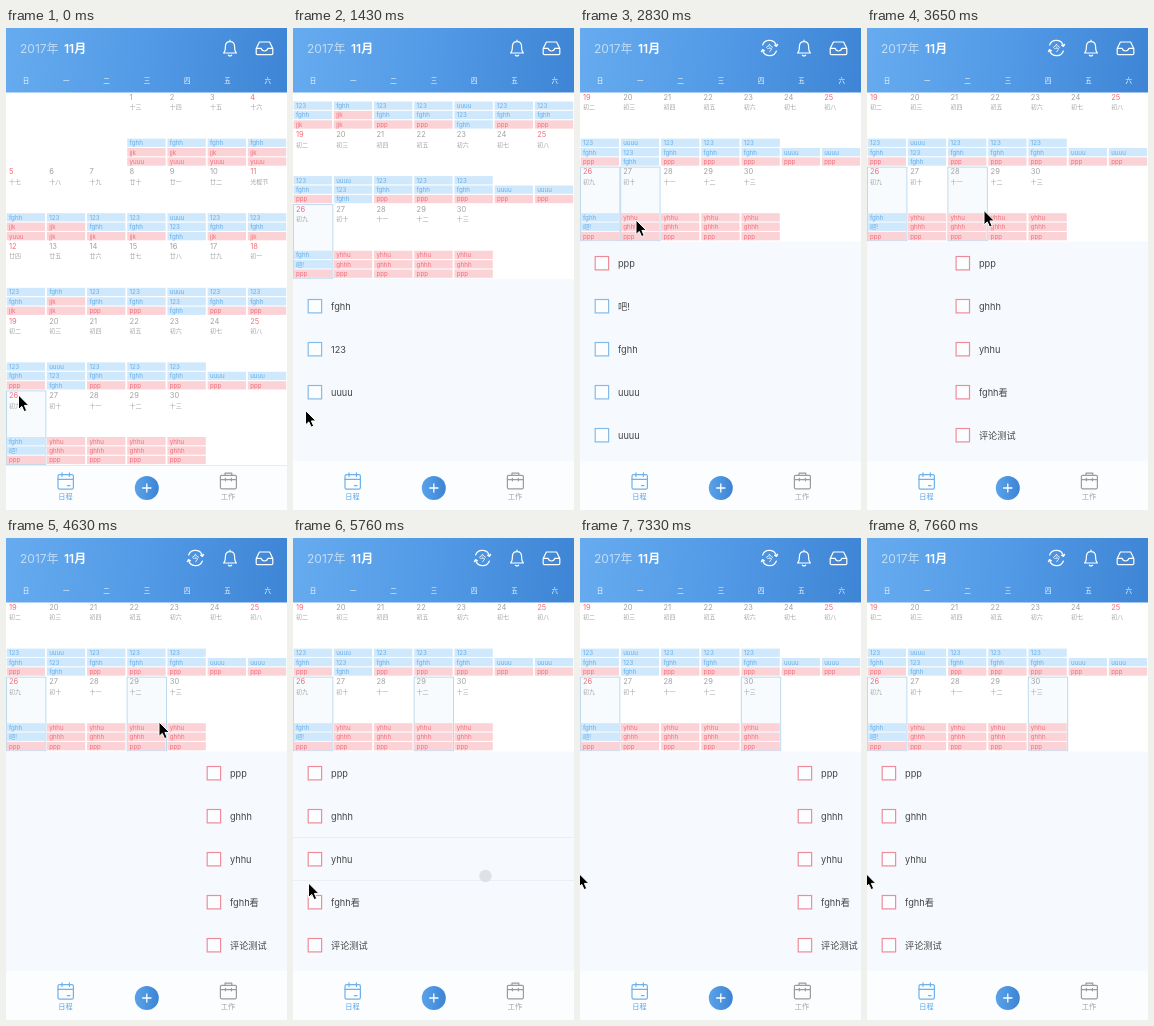
An HTML page for the animation above (7990 ms loop, 281 px wide and 482 px high).

```html
<!DOCTYPE html>
<html lang="zh-CN">
<head>
<meta charset="utf-8">
<title>日程</title>
<style>
html, body { margin: 0; width: 100%; height: 100%; overflow: hidden; background: #fff; }
svg { display: block; width: 281px; height: 482px; }
text { font-family: Inter, "Noto Sans CJK SC", "Noto Sans CJK", sans-serif; }
.line { fill: none; stroke-width: 1.2; stroke-linecap: round; stroke-linejoin: round; }
</style>
</head>
<body>
<svg id="stage" viewBox="0 0 281 482" xmlns="http://www.w3.org/2000/svg">
  <defs>
    <linearGradient id="sky" gradientUnits="userSpaceOnUse" x1="0" y1="20" x2="281" y2="50">
      <stop offset="0" stop-color="#66abef"/><stop offset=".5" stop-color="#529ae6"/><stop offset="1" stop-color="#3e86d5"/>
    </linearGradient>
    <linearGradient id="disc"><stop offset="0" stop-color="#5aa3ea"/><stop offset="1" stop-color="#3c84d4"/></linearGradient>
    <clipPath id="body"><rect y="64" width="281" height="373"/></clipPath>
  </defs>
  <rect width="281" height="482" fill="#fcfdfe"/>
  <rect y="200" width="281" height="233" fill="#f6fafe"/>
  <path id="tabLine" d="M0 428.5H281" stroke="#e0ebf5"/>
  <g id="pages"></g>
  <path id="rowTop" d="M0 299.5H281" stroke="#e9eff5"/>
  <path id="rowEnd" d="M0 342.5H281" stroke="#e9eff5"/>
  <g clip-path="url(#body)"><g id="cal"><rect y="64" width="281" height="373.2" fill="#fff"/></g></g>

  <rect width="281" height="64.5" fill="url(#sky)"/>
  <g id="head"></g>
  <g class="line" stroke="#fff">
    <g id="today">
      <path d="M182.6 17A7.2 7.2 0 0 1 196.4 18.2M196.4 23A7.2 7.2 0 0 1 182.6 21.8M194.6 17.2L196.5 18.4L197.6 16.4M184.4 22.8L182.5 21.6L181.4 23.6"/>
    </g>
    <path d="M217.6 25H230.4C228.8 23.6 228.6 22.4 228.6 18.6C228.6 15.4 226.8 13.6 224 13.6C221.2 13.6 219.4 15.4 219.4 18.6C219.4 22.4 219.2 23.6 217.6 25ZM222.4 27.2Q224 28.6 225.6 27.2M224 12.2V13.4"/>
    <path d="M250.2 20.4L253.4 14H263.6L266.8 20.4V25.4Q266.8 26.6 265.6 26.6H251.4Q250.2 26.6 250.2 25.4ZM250.2 20.4H255.2Q255.8 23 258.5 23Q261.2 23 261.8 20.4H266.8"/>
  </g>

  <rect y="437" width="281" height="45" fill="#fcfdfe"/>
  <path id="barLine" d="M0 437.5H281" stroke="#e6ebf0"/>
  <g class="line" stroke="#6fb1ea" stroke-width="1">
    <rect x="52" y="446.6" width="15.4" height="14.6" rx="1.6"/>
    <path d="M52 451.4H67.4M56 444.8V448.4M63.4 444.8V448.4M61.4 457.6H64"/>
  </g>
  <g class="line" stroke="#9b9b9b" stroke-width="1">
    <rect x="214.4" y="447.4" width="16" height="13.4" rx="1.2"/>
    <path d="M219 447.2V445.2H225.8V447.2M214.4 451.6H219.4M225.4 451.6H230.4M219.4 450.4V452.8M225.4 450.4V452.8M219.4 451.6H225.4"/>
  </g>
  <g id="tabs"></g>
  <circle cx="140.8" cy="460" r="12" fill="url(#disc)"/>
  <path d="M136.2 460H145.4M140.8 455.4V464.6" stroke="#fff" stroke-width="1.3"/>

  <circle id="touch" cy="338" r="6.2" fill="#d9dde2" opacity=".85"/>
  <path id="cursor" d="M0 0V14.4L3.3 11.4L5.6 16.6L8.2 15.5L5.9 10.4H10.4Z" fill="#000" stroke="#fff" stroke-width="1"/>
</svg>
<script>
const LOOP = 7990, W = 281, COL = 40.2, ROW = 74.6, TOP = 64;
const BLUE = '#64aeea', RED = '#f2707d';
const $ = id => document.getElementById(id);

function add(parent, tag, attrs, content) {
  const el = document.createElementNS('http://www.w3.org/2000/svg', tag);
  for (const k in attrs) el.setAttribute(k, attrs[k]);
  if (content) el.textContent = content;
  parent.appendChild(el);
  return el;
}

// Text placed by the vertical centre of its line
function label(parent, text, x, mid, size, fill, extra) {
  return add(parent, 'text', { x, y: mid + size * 0.36, 'font-size': size, fill, ...extra }, text);
}

const isRed = name => ['jjk', 'yuuu', 'yhhu', 'ghhh', 'ppp'].includes(name);
const mid = { 'text-anchor': 'middle' };

// Header and tab labels
label($('head'), '2017年', 14, 20.5, 12, '#fff', { opacity: 0.6 });
label($('head'), '11月', 58, 20.5, 12, '#fff', { 'font-weight': 600 });
[...'日一二三四五六'].forEach((d, i) => label($('head'), d, 20 + i * 40.3, 53, 6.5, '#fff', mid));
label($('today'), '今', 189.5, 20, 7.5, '#fff', { ...mid, stroke: 'none' });
label($('tabs'), '日程', 59.5, 468.8, 7.2, '#58a4e8', mid);
label($('tabs'), '工作', 222, 468.8, 7.2, '#a5a5a5', mid);

// Calendar
const lunar = ('十三 十四 十五 十六 十七 十八 十九 廿十 廿一 廿二 光棍节 廿四 廿五 廿六 廿七 廿八 廿九 ' +
  '初一 初二 初三 初四 初五 初六 初七 初八 初九 初十 十一 十二 十三').split(' ');
const first = 'fghh,jjk,yuuu', second = '123,fghh,jjk', third = '123,fghh,ppp';
const shifted = 'uuuu,123,fghh', late = ',uuuu,ppp', last = 'yhhu,ghhh,ppp';
const plans = [
  first, first, first, first,
  first, '123,jjk,jjk', second, second, shifted, second, second,
  second, 'fghh,jjk,jjk', third, third, shifted, third, third,
  third, shifted, third, third, third, late, late,
  'fghh,吧!,ppp', last, last, last, last
];
const cal = $('cal');
const cellBox = day => {
  const n = day + 2;
  return { x: (n % 7) * COL, y: TOP + Math.floor(n / 7) * ROW };
};
const frameOf = day => {
  const { x, y } = cellBox(day);
  return add(cal, 'rect', { x: x + 0.5, y: y + 0.5, width: COL - 0.8, height: ROW - 1,
    fill: '#f8fbfe', stroke: '#b9d6ec', 'stroke-width': 0.9 });
};
const picks = [26, 27, 28, 29, 30].map(frameOf);

plans.forEach((plan, i) => {
  const { x, y } = cellBox(i + 1);
  const weekend = (i + 3) % 7 === 0 || (i + 3) % 7 === 6;
  label(cal, i + 1, x + 3, y + 5, 7.5, weekend ? RED : '#a0a0a0');
  label(cal, lunar[i], x + 3, y + 15, 6, '#a2a2a2');
  plan.split(',').forEach((name, k) => {
    if (!name) return;
    const red = isRed(name), by = y + 46.6 + k * 9.4;
    add(cal, 'rect', { x: x + 0.6, y: by, width: COL - 1.8, height: 8.3, fill: red ? '#fbd3d6' : '#d0e8fb' });
    label(cal, name, x + 3, by + 4.3, 6.2, red ? RED : BLUE);
  });
});

// Task lists, one page per day
function page(index, names) {
  const g = add($('pages'), 'g', { transform: `translate(${index * W})` });
  names.split(' ').forEach((name, i) => {
    const y = 235.3 + i * 43, red = index > 0 || isRed(name);
    add(g, 'rect', { x: 15.2, y: y - 6.8, width: 13.4, height: 13.4, fill: '#fbfdff',
      stroke: red ? '#f08c9a' : '#86bbe9', 'stroke-width': 1.2 });
    label(g, name, 38, y + 0.3, 9.2, '#454545');
  });
  return g;
}
const oldList = page(0, 'ppp fghh 123 uuuu');
const newList = page(0, 'ppp 吧! fghh uuuu uuuu');
for (let i = 1; i < 6; i++) page(i, 'ppp ghhh yhhu fghh看 评论测试');

// Tracks: [time, values...]; two points at one time make a hard change
const shift = [[1430, 0], [1430, 186.3], [1480, 186.3], [1810, 223.8]];
const pan = [[2830, 0], [3150, 1], [3650, 1], [3650, 1.737], [3695, 1.737], [3765, 2],
  [4510, 2], [4820, 3], [5820, 3], [6130, 4], [7220, 4], [7540, 5]];
const pointer = [[840, 12.5, 367], [950, 12.5, 382.5], [1490, 12.5, 382.5], [1800, 12.5, 380.5],
  [2110, 12.5, 380.5], [2530, 56, 192], [3040, 56, 192], [3200, 117, 182.5],
  [3990, 117, 182.5], [4160, 153, 184], [4830, 153, 184], [5290, 192, 331.5],
  [5590, 192, 331.5], [5740, 15.5, 345], [6100, 15.5, 345], [6370, 72, 336],
  [6420, 72, 336], [6635, 192, 331.5], [6670, 192, 331.5], [6810, 203, 330.5],
  [6950, 203, 330.5], [7200, -1.5, 335]];

const smooth = u => u * u * (3 - 2 * u);
const easeOut = u => 1 - (1 - u) ** 3;

function at(track, t, ease = smooth) {
  const next = track.findIndex(p => p[0] > t);
  if (next === 0) return track[0].slice(1);
  if (next < 0) return track[track.length - 1].slice(1);
  const a = track[next - 1], b = track[next];
  const u = ease((t - a[0]) / (b[0] - a[0]));
  return a.slice(1).map((v, i) => v + (b[i + 1] - v) * u);
}

const show = (el, on) => el.setAttribute('visibility', on ? 'visible' : 'hidden');
const move = (el, x, y) => el.setAttribute('transform', `translate(${x.toFixed(2)} ${y.toFixed(2)})`);
const within = (t, a, b) => t >= a && t < b;
const pickTimes = [0, 2830, 3650, 4510, 5870, LOOP];

function draw(t) {
  move(cal, 0, -at(shift, t, easeOut)[0]);
  move($('pages'), -W * at(pan, t)[0], 0);
  move($('cursor'), ...at(pointer, t));
  picks.forEach((el, i) => show(el, i === 0 || within(t, pickTimes[i], pickTimes[i + 1])));
  show(oldList, t < 1620);
  show(newList, t >= 1620);
  show($('today'), t >= 2830);
  show($('barLine'), t < 1430);
  show($('tabLine'), within(t, 1700, 2830));
  show($('rowTop'), within(t, 5590, 5820));
  show($('rowEnd'), within(t, 5590, 7220));
  show($('touch'), within(t, 5590, 5820) || within(t, 6950, 7220));
  $('touch').setAttribute('cx', t < 6500 ? 192.5 : 203.5);
}

const start = performance.now();
function tick() {
  draw((performance.now() - start) % LOOP);
  requestAnimationFrame(tick);
}
tick();
</script>
</body>
</html>
```
